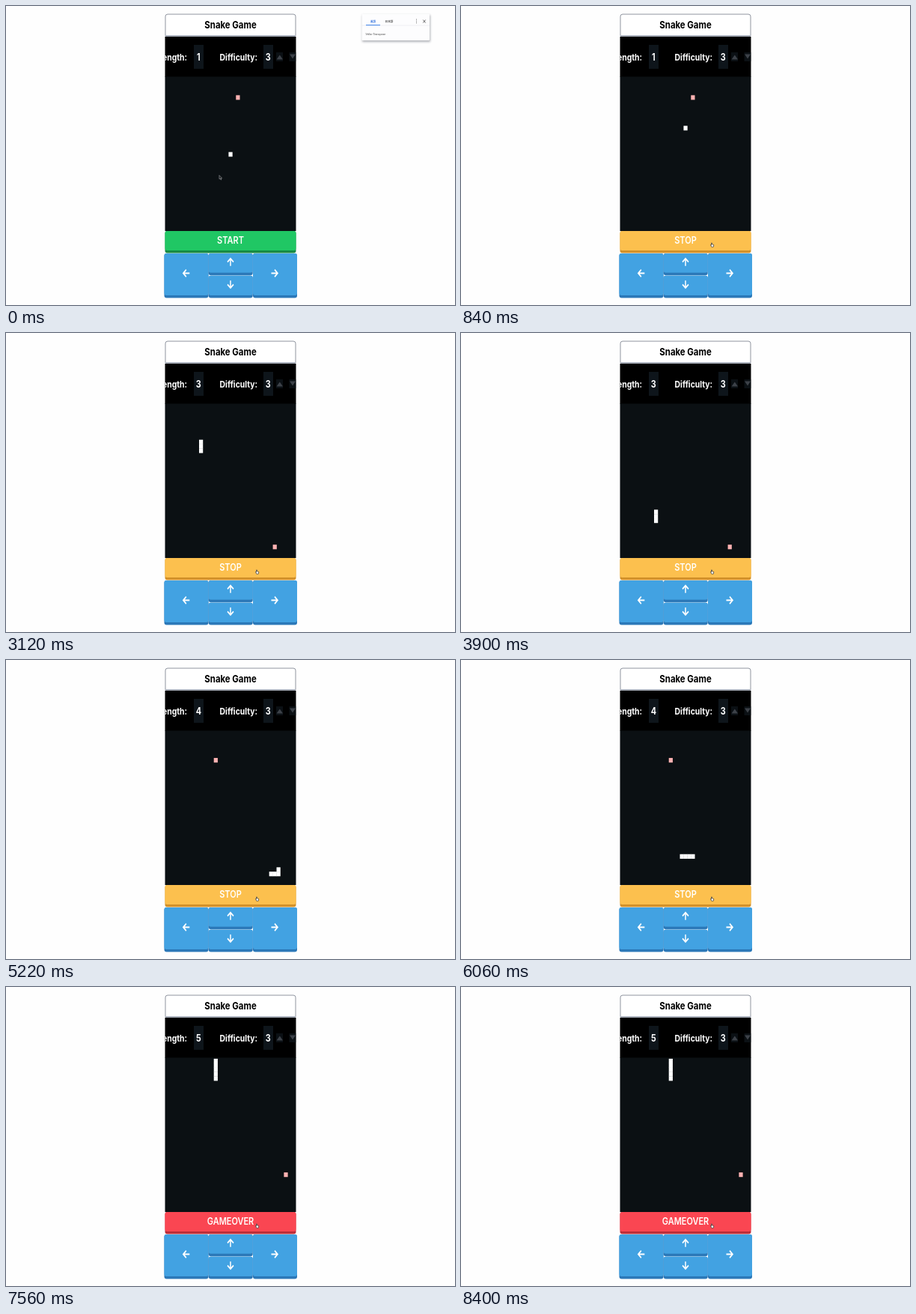
Recreate the animation shown at these times as an HTML page. Size 600 by 400 pixels, loop 8520 ms.

```html
<!DOCTYPE html>
<html lang="en">
<head>
<meta charset="utf-8">
<title>Snake Game</title>
<style>
html, body { margin: 0; width: 100%; height: 100%; overflow: hidden; background: #fefefe; }
svg { display: block; width: 600px; height: 400px; }
text { font: 600 11px Inter, "Liberation Sans", sans-serif; text-anchor: middle; }
.bold { font-weight: 700; }
.end { text-anchor: end; }
.cjk { font: 700 3.6px "Noto Sans CJK JP", "Noto Sans CJK", sans-serif; }
.tiny { font: 400 3.6px Roboto, sans-serif; text-anchor: start; }
</style>
</head>
<body>
<svg viewBox="0 0 600 400">
  <defs>
    <filter id="soft" x="-10%" y="-20%" width="120%" height="150%"><feGaussianBlur stdDeviation="1.4"/></filter>
    <clipPath id="panel"><rect x="212.5" y="41" width="175" height="260"/></clipPath>
  </defs>
  <path d="M213 40V14q0-3 3-3h168q3 0 3 3v26z" fill="#fff" stroke="#8f949e"/>
  <path d="M213 40h174" stroke="#a3abb8" stroke-width="1.6"/>
  <g clip-path="url(#panel)">
    <rect x="212" y="41" width="176" height="54" fill="#000"/>
    <rect x="212" y="94.5" width="176" height="207" fill="#0b1013"/>
    <path d="M251 52h13v32h-13zM344 52h13v32h-13z" fill="#0e151b"/>
    <path d="M361 62h9v12h-9zM378.500 62h9v12h-9z" fill="#0b1014"/>
    <path d="M361.500 71.500h8.500l-4.200-6zM379 64.500h8l-4 6z" fill="#3c4148"/>
    <g id="labels" fill="#fff"></g>
    <rect id="food" fill="#feb2b2"/>
    <g id="snake" fill="#fff"></g>
  </g>
  <g id="pad"></g>
  <g id="popup">
    <rect x="476" y="12" width="91" height="36" rx="1" fill="#666a74" opacity=".5" filter="url(#soft)"/>
    <rect x="475.500" y="10.500" width="90.500" height="35.500" rx="1" fill="#fdfdfe"/>
    <path d="M475.500 26h90.500" stroke="#e4e5ea" stroke-width=".6"/>
    <path d="M481 25.500h19" stroke="#4285e8"/>
    <text class="cjk" x="490.500" y="21.700" fill="#2f70dd">英語</text>
    <text class="cjk" x="512" y="21.700" fill="#555">日本語</text>
    <path d="M548.500 17.500v1m0 1.300v1m0 1.300v1M557.300 18.500l3.400 4m0-4l-3.400 4" stroke="#444" stroke-width=".8"/>
    <text class="tiny" x="480.500" y="39.200" fill="#444">Vellor Transpose</text>
  </g>
  <g id="cursor">
    <path id="arrow" d="M0 0v5l1.200-1 .9 2 .8-.4-.8-1.800h1.500z" fill="#111" stroke="#aaadb2" stroke-width=".6"/>
    <path id="hand" d="M0 0v3l-1-.5 1.200 2.800h2.600l.5-2.700-2.300-.7V0z" fill="#fff" stroke="#3a3a3a" stroke-width=".7"/>
  </g>
</svg>
<script>
const $ = id => document.getElementById(id);
const LOOP = 8520, FRAME = 60, STEP = 48, CLICK = 480, ASPECT = 1.187;
const CELL_W = 4.93, CELL_H = 5.85;

const label = (x, y, s, size, cls = '', id = '') =>
  `<text id="${id}" class="${cls}" transform="translate(${x} ${y}) scale(1 ${ASPECT})" style="font-size:${size}px">${s}</text>`;

function button(x, y, w, h, face, edge, id = '') {
  return `<g id="${id}"><rect x="${x}" y="${y}" width="${w}" height="${h}" rx="3" fill="${edge}"/>` +
    `<rect x="${x}" y="${y}" width="${w}" height="${h - 3.5}" rx="3" fill="${face}"/></g>`;
}

function padKey(x, y, w, h, cx, cy, turn) {
  return button(x, y, w, h, '#42a2e2', '#2b78b8') +
    `<path transform="translate(${cx} ${cy}) scale(1 ${ASPECT}) rotate(${turn})" d="M4.500 0H-4M0-4L-4 0L0 4"
      fill="none" stroke="#fff" stroke-width="1.5"/>`;
}

$('labels').innerHTML =
  label(242, 73, 'Length:', 10.4, 'bold end') +
  label(310.8, 73, 'Difficulty:', 10.4, 'bold') +
  label(257.3, 73, '1', 10.8, 'bold', 'count') +
  label(350.3, 73, '3', 10.8, 'bold');

$('pad').innerHTML =
  label(300, 30, 'Snake Game', 11.4, 'bold') +
  button(212.5, 301, 175, 29.5, '', '', 'main') +
  label(300, 318, '', 11, '', 'caption') +
  padKey(211.5, 331, 59, 59.5, 240.8, 357.5, 0) +
  padKey(270.7, 331, 59, 29.2, 300, 342.5, 90) +
  padKey(270.7, 360.8, 59, 29.7, 300, 372.5, 270) +
  padKey(330, 331, 59, 59.5, 359, 357.5, 180);

// Route in cells; column 0 is the middle of the board, row 0 its top.
const dirs = { U: [0, -1], D: [0, 1], L: [-1, 0], R: [1, 0] };
const foods = [[2, 4], [-11, 9], [12, 32], [-4, 6], [15, 26]];
const route = [[0, 17]];
const eaten = [0];
for (const [, d, n] of 'U13R5D6L16U5R3D27R21U4L17U28'.matchAll(/(\w)(\d+)/g)) {
  for (let i = 0; i < n; i++) {
    const [x, y] = route.at(-1), cell = [x + dirs[d][0], y + dirs[d][1]];
    const k = eaten.at(-1);
    route.push(cell);
    eaten.push(k + (String(cell) === String(foods[k])));
  }
}

// Each cell overlaps its neighbours slightly so that the body shows no seams.
const cellBox = ([c, r]) => ({
  x: 299.9 + (c - 0.5) * CELL_W, y: 95.95 + r * CELL_H,
  width: CELL_W + 0.3, height: CELL_H + 0.3
});
const setAll = (el, attrs) => Object.entries(attrs).forEach(([k, v]) => el.setAttribute(k, v));
const toRect = cell => {
  const b = cellBox(cell);
  return `<rect x="${b.x}" y="${b.y}" width="${b.width}" height="${b.height}"/>`;
};

const modes = {
  START: ['#20c764', '#188a45'],
  STOP: ['#fcc04e', '#d4922a'],
  GAMEOVER: ['#fa4652', '#bd2f3b']
};

function draw(t) {
  const step = Math.max(0, Math.floor((t - 1860) / STEP + 27.25));
  const at = Math.min(step, route.length - 1);
  const k = eaten[at];
  const mode = t < CLICK ? 'START' : step < route.length ? 'STOP' : 'GAMEOVER';

  $('snake').innerHTML = route.slice(Math.max(0, at - k), at + 1).map(toRect).join('');
  setAll($('food'), cellBox(foods[k]));
  $('count').textContent = k + 1;

  const [face, edge] = modes[mode];
  const [back, front] = $('main').children;
  back.setAttribute('fill', edge);
  front.setAttribute('fill', face);
  $('caption').setAttribute('fill', '#fffefa');
  $('caption').textContent = mode;

  const p = Math.min(1, t / 420), e = p * p * (3 - 2 * p);
  const x = 285 + 49.5 * e, y = 226.5 + 90.5 * e;
  const over = y > 301;
  $('cursor').setAttribute('transform', `translate(${x} ${y})`);
  $('arrow').style.display = over ? 'none' : '';
  $('hand').style.display = over ? '' : 'none';
  $('popup').style.display = t < CLICK ? '' : 'none';
}

const begin = performance.now();
function tick() {
  const t = (performance.now() - begin) % LOOP;
  draw(Math.floor(t / FRAME) * FRAME);
  requestAnimationFrame(tick);
}
tick();
</script>
</body>
</html>
```
